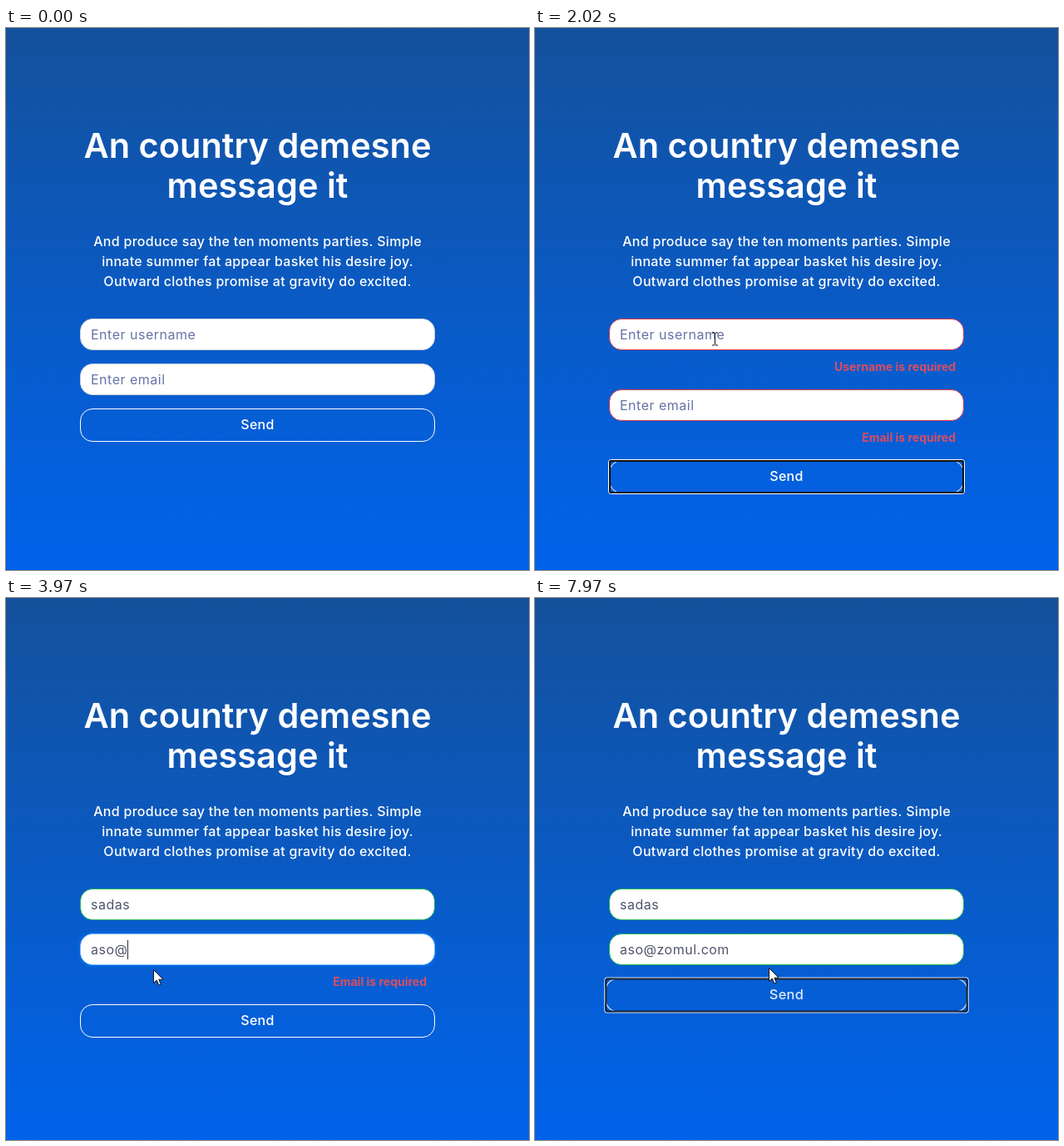
An HTML page with a canvas that plays this animation: 629 px wide and 651 px high, repeating every 8000 ms.

```html
<!DOCTYPE html>
<html lang="en">
<head>
<meta charset="utf-8">
<title>Sign-up form</title>
<style>
  html, body { margin: 0; width: 100%; height: 100%; overflow: hidden; background: #0b5ac3; }
  canvas { display: block; width: 629px; height: 651px; }
</style>
</head>
<body>
<canvas id="stage" width="629" height="651"></canvas>
<script>
const ctx = document.getElementById('stage').getContext('2d');
const W = 629, H = 651, LOOP = 8000;
const LEFT = 89, WIDTH = 427, MID = 302.5, RADIUS = 14.5;
const SANS = 'Inter, "Open Sans", sans-serif';
const LIST_FONT = '500 12.2px "Noto Sans", "Open Sans", sans-serif';

// Moments of the story, in ms
const PRESS = 1060, REJECT = 1140, FOCUS_USER = 2090, FOCUS_EMAIL = 3120, PRESS_AGAIN = 6560;

const userKeys = { text: 'sadas', times: [2250, 2410, 2570, 2720, 2800] };
const emailKeys = {
  text: 'aso@zomul.com',
  times: [3430, 3500, 3660, 3970, 4360, 4520, 4760, 4830, 5060, 5380, 5460, 5610, 5770]
};

const userHints = ['sdasd', 'sdf', 'ssdd', 'sdsda', 'sdfsdf', 'sddas'];
const emailHints = ['albitina.krozfel@irvo.eu', 'asd', 'arno.lis2742@zumboka.pl',
  'arnolis2742@zumboka.pl', 'adsda', 'alvika_37'];
const lists = [
  { from: 2170, to: 2410, y: 388, items: userHints },
  { from: 3190, to: 3580, y: 442, items: emailHints },
  { from: 3580, to: 3660, y: 442, items: emailHints.slice(2, 5) },
  { from: 3660, to: 3970, y: 442, items: ['adsda'] }
];

// Pointer: time, x, y
const path = [
  [200, 300, 655], [660, 285, 477], [1300, 285, 477], [1900, 216, 373], [2800, 216, 373],
  [3060, 177, 446], [6100, 177, 446], [6500, 288, 500], [7650, 288, 500],
  [7870, 284, 497], [7960, 281, 444]
];

// Button hover: start, from, to
const hovers = [[560, 0, 1], [1140, 1, 0], [6440, 0, 1], [6560, .657, 0], [7900, 0, 1]];

const clamp = v => Math.max(0, Math.min(1, v));
const smooth = v => v * v * (3 - 2 * v);
const easeOut = v => 1 - (1 - v) ** 3;
const within = (t, a, b) => t >= a && t < b;
const typed = (keys, t) => keys.text.slice(0, keys.times.filter(k => k <= t).length);

function hoverAt(t) {
  const seg = hovers.filter(s => s[0] <= t).pop();
  if (!seg) return 0;
  const [start, from, to] = seg;
  return from + (to - from) * easeOut(clamp((t - start) / 400));
}

function pointerAt(t) {
  const i = path.findIndex(p => p[0] > t);
  if (i === 0) return path[0].slice(1);
  if (i < 0) return path[path.length - 1].slice(1);
  const a = path[i - 1], b = path[i];
  const k = smooth((t - a[0]) / (b[0] - a[0]));
  return [a[1] + (b[1] - a[1]) * k, a[2] + (b[2] - a[2]) * k];
}

function text(str, x, y, font, color, align = 'left', spacing = 0) {
  ctx.font = font;
  ctx.fillStyle = color;
  ctx.textAlign = align;
  ctx.letterSpacing = spacing + 'px';
  ctx.fillText(str, x, y);
}

function box(x, y, w, h, r) {
  ctx.beginPath();
  ctx.roundRect(x, y, w, h, r);
}

function outline(color, width) {
  ctx.strokeStyle = color;
  ctx.lineWidth = width;
  ctx.stroke();
}

function drawPage() {
  const sky = ctx.createLinearGradient(0, 0, 0, H);
  sky.addColorStop(0, '#14519c');
  sky.addColorStop(1, '#0063eb');
  ctx.fillStyle = sky;
  ctx.fillRect(0, 0, W, H);

  ['An country demesne', 'message it'].forEach((line, i) =>
    text(line, MID, 156 + i * 48, '600 41.5px ' + SANS, '#fff', 'center'));
  ['And produce say the ten moments parties. Simple',
   'innate summer fat appear basket his desire joy.',
   'Outward clothes promise at gravity do excited.'].forEach((line, i) =>
    text(line, MID, 262 + i * 24, '500 16px ' + SANS, '#fff', 'center', .3));
}

function drawField(y, value, hint, border, focused) {
  if (focused) {
    box(LEFT - 1, y - 1, WIDTH + 2, 40, RADIUS + 1);
    outline('rgba(0,123,255,.3)', 3);
  }
  box(LEFT + .5, y + .5, WIDTH - 1, 37, RADIUS);
  ctx.fillStyle = '#fff';
  ctx.fill();
  outline(focused ? '#80bdff' : border, 1);
  text(value || hint, 102, y + 25, '16px ' + SANS, value ? '#50546c' : '#6672a6', 'left', .5);
  if (focused) {
    const end = value ? 102 + ctx.measureText(value).width : 102;
    ctx.fillStyle = '#2b2d3a';
    ctx.fillRect(Math.round(end), y + 8, 1, 23);
  }
}

function drawError(str, y) {
  text(str, 506, y, '700 14px ' + SANS, '#dc4d60', 'right');
}

function drawButton(y, hover, ring) {
  const scale = 1 + .05 * hover;
  ctx.save();
  ctx.translate(MID, y + 20);
  ctx.scale(scale, scale);
  ctx.translate(-MID, -y - 20);
  ctx.globalAlpha = 1 - .28 * hover;
  box(LEFT + .5, y + .5, WIDTH - 1, 39, RADIUS);
  outline('#fff', 1 + .5 * hover);
  text('Send', MID, y + 25, '500 16px ' + SANS, '#fff', 'center', .3);
  if (ring) {
    box(LEFT - .5, y - .5, WIDTH + 1, 41, 3);
    outline('#fff', 1);
    box(LEFT + 1, y + 1, WIDTH - 2, 38, 2);
    outline('#101010', 2);
  }
  ctx.restore();
}

function drawList({ y, items }) {
  ctx.save();
  ctx.shadowColor = 'rgba(0,0,0,.25)';
  ctx.shadowBlur = 1.5;
  ctx.shadowOffsetY = 1;
  box(88, y, 429, items.length * 36 + 16, 3);
  ctx.fillStyle = '#fff';
  ctx.fill();
  ctx.restore();
  items.forEach((item, i) => text(item, 100, y + 31 + i * 36, LIST_FONT, '#1c1c1e'));
}

const arrow = new Path2D('M0 0V16L3.8 12.6L6.4 18.6L8.8 17.6L6.3 11.7H11.5Z');
const hand = new Path2D('M-1.5 1.2Q0 -1 1.5 1.2V7.5Q3.2 6.3 4.3 8Q6 7.2 6.8 8.8' +
  'Q8.8 8.4 9 10.5V15.5Q8.6 18.5 7 20V22H-1V20L-6 13.5Q-6.6 11.4 -4.6 11.4L-1.5 14Z');

function drawPointer(x, y, shape) {
  ctx.save();
  ctx.translate(Math.round(x) + .5, Math.round(y) + .5);
  if (shape === 'beam') {
    ctx.fillStyle = '#111';
    ctx.fillRect(-.5, -7, 1, 14);
    for (const top of [-8, 7]) {
      ctx.fillRect(-3.5, top, 3, 1);
      ctx.fillRect(.5, top, 3, 1);
    }
  } else {
    const icon = shape === 'hand' ? hand : arrow;
    ctx.fillStyle = '#fff';
    ctx.strokeStyle = '#111';
    ctx.lineWidth = 1;
    ctx.lineJoin = 'round';
    ctx.fill(icon);
    ctx.stroke(icon);
    if (shape === 'hand') {
      ctx.beginPath();
      for (const k of [1.5, 4.3, 6.8]) {
        ctx.moveTo(k, 8);
        ctx.lineTo(k, 11.5);
      }
      ctx.stroke();
    }
  }
  ctx.restore();
}

function render(t) {
  const userError = within(t, REJECT, FOCUS_EMAIL);
  const emailError = within(t, REJECT, PRESS_AGAIN);
  const userY = 349;
  const emailY = 403 + (userError ? 31 : 0);
  const sendY = emailY + 54 + (emailError ? 31 : 0);
  const border = (bad, done) => bad ? '#dc3545' : done ? '#20b35a' : '#ced4da';

  drawPage();
  drawField(userY, typed(userKeys, t), 'Enter username',
    border(userError, t >= FOCUS_EMAIL), within(t, FOCUS_USER, FOCUS_EMAIL));
  drawField(emailY, typed(emailKeys, t), 'Enter email',
    border(emailError, t >= PRESS_AGAIN), within(t, FOCUS_EMAIL, PRESS_AGAIN));
  if (userError) drawError('Username is required', userY + 63);
  if (emailError) drawError('Email is required', emailY + 63);
  drawButton(sendY, hoverAt(t), within(t, PRESS, FOCUS_USER) || t >= PRESS_AGAIN);
  lists.filter(l => within(t, l.from, l.to)).forEach(drawList);

  if (t < path[0][0]) return;
  const [x, y] = pointerAt(t);
  const over = (top, h) => y >= top && y <= top + h;
  const shape = over(sendY, 40) ? 'hand'
    : over(userY, 38) || over(emailY, 38) ? 'beam' : 'arrow';
  drawPointer(x, y, shape);
}

const begin = performance.now();
function tick() {
  render((performance.now() - begin) % LOOP);
  requestAnimationFrame(tick);
}
tick();
</script>
</body>
</html>
```
